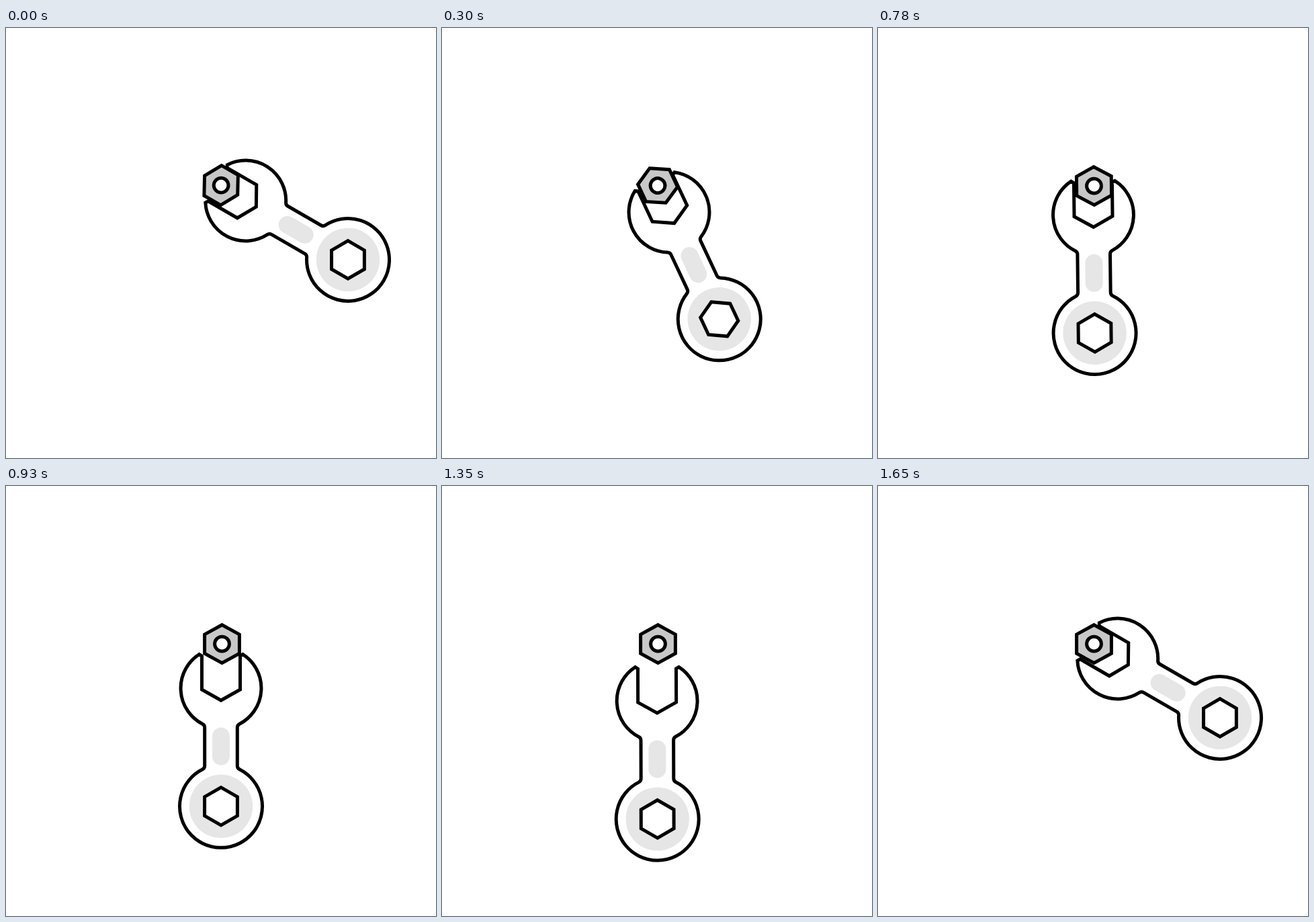
Recreate the animation shown at these times as an HTML page. Size 640x640 px, loop 1.86 s.

```html
<!DOCTYPE html>
<html lang="en">
<head>
<meta charset="utf-8">
<title>Wrench and nut</title>
<style>
  html, body { margin: 0; width: 100%; height: 100%; overflow: hidden; background: #fff; }
  svg { display: block; width: 100%; height: 100%; }
  .line { fill: #fff; stroke: #000; stroke-width: 5; }
  .shade { fill: #e6e6e6; }
</style>
</head>
<body>
<svg viewBox="0 0 640 640">
  <!-- Both groups turn about the pivot at their local origin -->
  <g id="wrench">
    <path class="line" d="M28.5 -5.5 L32.5 -8 A60 60 0 0 1 27.5 95.7 A6 6 0 0 0 24.3 101
      V158 A6 6 0 0 0 27.6 163.3 A61.5 61.5 0 1 1 -27.6 163.3 A6 6 0 0 0 -24.3 158
      V101 A6 6 0 0 0 -27.5 95.7 A60 60 0 0 1 -32.5 -8 L-28.5 -5.5 V44.5 L0 60.5 L28.5 44.5 Z"/>
    <rect class="shade" x="-13" y="101" width="26" height="56" rx="13"/>
    <circle class="shade" cy="218.2" r="47.2"/>
    <path class="line" d="M0 190 L24.4 204.1 V232.3 L0 246.4 L-24.4 232.3 V204.1 Z"/>
  </g>
  <g id="nut">
    <g transform="translate(1.5 -.7)">
      <path class="line" style="fill:#c8c8c8" d="M0 -28.4 L25.9 -14.2 V14.2 L0 28.4 L-25.9 14.2 V-14.2 Z"/>
      <circle class="line" r="10.9"/>
    </g>
  </g>
</svg>
<script>
  const LOOP = 1860, STEP = 30, START = -60, PULL = 41.8;
  const wrench = document.getElementById('wrench');
  const nut = document.getElementById('nut');

  const progress = (t, from, length) => Math.min(1, Math.max(0, (t - from) / length));
  const easeOut = (p, power) => 1 - (1 - p) ** power;
  const easeInOut = p => p < .5 ? 4 * p ** 3 : 1 - 4 * (1 - p) ** 3;
  const place = (el, angle, dy) =>
    el.setAttribute('transform', `translate(320 ${235.8 + dy}) rotate(${angle})`);

  function draw(now) {
    const t = Math.floor(now % LOOP / STEP) * STEP;
    const turn = START * (1 - easeOut(progress(t, 0, 885), 2.1));
    const pull = PULL * easeOut(progress(t, 800, 400), 2);
    const back = easeInOut(progress(t, 1320, 330));
    place(wrench, turn + START * back, pull * (1 - back));
    place(nut, turn, 0);
  }

  const begin = performance.now();
  function tick() {
    draw(performance.now() - begin);
    requestAnimationFrame(tick);
  }
  tick();
</script>
</body>
</html>
```
